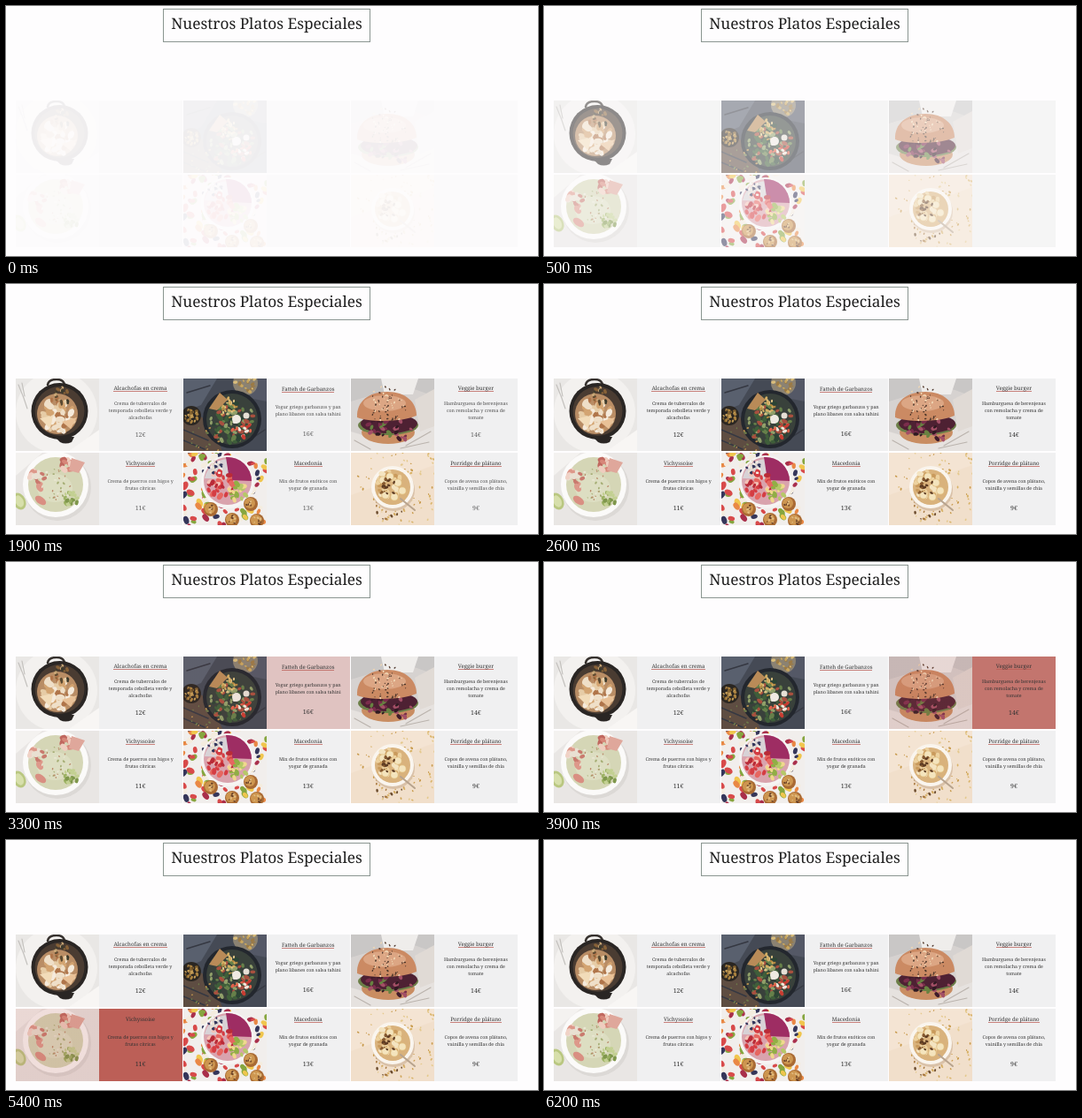
Animation of 600x283 px, one loop 6.3 s. Source, as an HTML page:

```html
<!DOCTYPE html>
<html lang="es">
<head>
<meta charset="utf-8">
<title>Nuestros Platos Especiales</title>
<style>
  html, body { margin: 0; width: 100%; height: 100%; overflow: hidden; background: #fefdfe; }
  body { font-family: "Noto Serif", serif; text-rendering: geometricPrecision; }
  #stage { position: relative; width: 600px; height: 283px; overflow: hidden; }
  h1 {
    position: absolute; left: 177px; top: 3px; width: 232px; height: 36px; margin: 0;
    border: 1px solid #8a9590; font: 400 17.25px/34px "Noto Serif", serif;
    color: #1f1f1f; text-align: center; white-space: nowrap;
  }
  .dish { position: absolute; width: 188px; height: 82px; }
  .dish > * { position: absolute; }
  .photo { left: 0; top: 0; width: 94px; height: 82px; animation: photo 6300ms infinite; }
  .panel { left: 94px; top: 0; width: 94px; height: 82px; background: #f0f0f1; animation: panel 6300ms infinite; }
  .hot {
    inset: 0; opacity: 0; animation: hot 6300ms infinite;
    background: linear-gradient(to right, rgba(187, 93, 84, .18) 50%, #bb5d54 50%);
  }
  .name, .text, .price { left: 94px; width: 93px; margin: 0; text-align: center; white-space: nowrap; color: #333; }
  .name { font-size: 6.1px; line-height: 7px; animation: name 6300ms infinite; }
  .name span { display: inline-block; height: 7px; border-bottom: 1px solid rgba(187, 93, 84, .75); }
  .text { font-size: 5.25px; line-height: 8px; animation: text 6300ms infinite; }
  .price { font-size: 7px; line-height: 8px; animation: price 6300ms infinite; }

  @keyframes photo { 0% { opacity: .07; animation-timing-function: ease-in-out } 16%, 100% { opacity: 1 } }
  @keyframes panel { 0% { opacity: .3; animation-timing-function: ease-in-out } 17%, 100% { opacity: 1 } }
  @keyframes name { 0%, 11% { opacity: 0; animation-timing-function: ease } 28%, 100% { opacity: 1 } }
  @keyframes text { 0%, 15% { opacity: 0; animation-timing-function: ease } 42%, 100% { opacity: 1 } }
  @keyframes price { 0%, 22% { opacity: 0; animation-timing-function: ease } 40%, 100% { opacity: 1 } }
  /* eases in, clears at once */
  @keyframes hot {
    0% { opacity: 0; animation-timing-function: ease }
    4.8%, 7.6% { opacity: 1; animation-timing-function: step-end }
    7.61%, 100% { opacity: 0 }
  }
</style>
</head>
<body>
<div id="stage"><h1>Nuestros Platos Especiales</h1></div>
<script>
const oval = (x, y, rx, ry, fill, turn = 0) =>
  `<ellipse cx="${x}" cy="${y}" rx="${rx}" ry="${ry}" fill="${fill}" transform="rotate(${turn} ${x} ${y})"/>`;
const disc = (x, y, r, fill) => oval(x, y, r, r, fill);
const area = (d, fill) => `<path d="${d}" fill="${fill}"/>`;
const line = (d, stroke, width) =>
  `<path d="${d}" fill="none" stroke="${stroke}" stroke-width="${width}" stroke-linecap="round"/>`;
const ground = fill => area('M0 0H94V82H0Z', fill);

function random(seed) {
  return () => (seed = (seed * 16807) % 2147483647) / 2147483647;
}

// Ovals strewn over a disc
function strew(seed, count, x, y, spread, size, colours) {
  const rnd = random(seed * 7919);
  let out = '';
  for (let i = 0; i < count; i++) {
    const a = rnd() * Math.PI * 2, d = Math.sqrt(rnd()) * spread, s = size * (.6 + rnd() * .7);
    out += oval((x + d * Math.cos(a)).toFixed(1), (y + d * Math.sin(a)).toFixed(1),
      s.toFixed(1), (s * .65).toFixed(1), colours[i % colours.length], Math.round(rnd() * 180));
  }
  return out;
}

const photos = [
  // artichokes in a black pot
  ground('#e9e7e5') + disc(46, 38, 46, '#f3f1ef') + area('M60 82L94 58V82Z', '#f8f6f4') +
  line('M3 7L9 22L13 34M7 5L10 20', '#c3c0bd', 1.2) +
  line('M36 7Q37 1 46 1Q54 1 55 7', '#36312e', 2.5) +
  area('M44 66H66L63 72Q56 75 50 72Z', '#2a2624') +
  disc(49.5, 37, 32, '#2a2624') + disc(49.5, 37, 28, '#4a3c32') + disc(47, 40, 23, '#b98d65') +
  strew(4, 52, 47, 41, 20, 4.6, ['#efdfc8', '#d3a471', '#f5eadb', '#b0754a', '#e6cca6']) +
  strew(9, 16, 54, 20, 10, 2.2, ['#5b4a32', '#876238', '#3c3a2c', '#c9a777']) +
  area('M27 45L42 42L39 57Z', '#f2dcb9') + area('M52 49L69 44L62 57Z', '#e9c197'),

  // chickpea bowl on a dark table
  ground('#454a55') + area('M0 30L30 50L44 82H0Z', '#5e4d42') + area('M0 0H38L20 30L0 38Z', '#59606e') +
  area('M62 0H94V26L74 22Z', '#545866') + line('M0 58L28 70M0 70L24 80M4 16L30 8M74 70L92 58', '#353842', 1.5) +
  disc(70, 5, 14, '#8b8272') + strew(3, 24, 70, 4, 12, 2.2, ['#c9a75f', '#d9bd7b', '#9b7a45']) +
  disc(9, 42, 11, '#2a2622') + strew(5, 26, 9, 42, 8, 2, ['#a9813f', '#c29b56', '#80602f']) +
  disc(55, 46, 33, '#23272e') + disc(55, 46, 29, '#39413b') +
  strew(8, 76, 55, 48, 25, 3.2, ['#3f5e3a', '#66804a', '#2c4434', '#90a06a', '#a8503f']) +
  strew(12, 28, 51, 33, 12, 2.2, ['#d2ad62', '#b5893f', '#e0c586']) +
  area('M29 34L41 16L50 24L38 36Z', '#b98b58') +
  strew(15, 16, 66, 57, 11, 2.8, ['#c93d32', '#e0624b', '#efe9dc']) +
  disc(60, 46, 5, '#efeae2') + disc(71, 42, 3.5, '#e6dfd5') +
  strew(6, 18, 24, 72, 18, 1.5, ['#b98f4e', '#6f7b4a']),

  // burger on paper
  ground('#d6d2d0') + area('M0 0H94V20L60 8L0 26Z', '#c9c7c6') + area('M34 0H76L70 18H38Z', '#efedeb') +
  area('M0 60L40 72L94 44V82H0Z', '#e6e2df') + area('M72 24L94 12V54L78 60Z', '#e0dad5') +
  line('M62 76L90 60M56 79L88 72M4 70L22 80', '#bbb4ae', 1.2) +
  oval(42, 61, 30, 13, '#c98d62') + oval(42, 53, 34, 11, '#6c7f48') +
  oval(43, 51, 32, 11, '#4e2133') +
  strew(7, 44, 44, 52, 26, 3, ['#7b2d4c', '#3f1b2a', '#a34f66', '#688241', '#2f1a22']) +
  area('M7 44C6 26 20 15 41 15S74 27 74 42C60 49 22 50 7 44Z', '#cb8a63') +
  oval(38, 28, 24, 9, '#dca684') +
  strew(11, 70, 41, 30, 22, 1.1, ['#f0d7b5', '#4b352a', '#5a4032']),

  // cold soup
  ground('#e9e6e4') + area('M0 0H30L0 26Z', '#f4f2f0') + oval(4, 55, 7, 10, '#b9c780', -25) +
  oval(4, 55, 4.5, 7, '#d7dfab', -25) + disc(47, 39, 38, '#dcd9d6') + disc(45, 36, 37, '#fbfaf9') +
  disc(45, 36, 31, '#d5d6b6') + oval(44, 40, 20, 16, '#dddec2') +
  strew(2, 14, 23, 31, 10, 4.6, ['#dd988a', '#c97a6e', '#f0d2c6', '#e9e0d2']) +
  strew(10, 10, 57, 13, 8, 4.4, ['#d78779', '#efcdbf', '#c0685f']) +
  area('M63 6L78 11L71 23L60 20Z', '#dfa79b') + oval(28, 54, 7, 4, '#d98f82', 35) +
  strew(6, 20, 62, 52, 8, 2.8, ['#9ab061', '#c3d092', '#7f974c']) +
  strew(14, 34, 44, 38, 20, 1.3, ['#a5ad74', '#e9e6d4', '#b98a6a']),

  // fruit bowl
  ground('#f1eeec') +
  strew(17, 170, 47, 41, 60, 4, ['#d84a4a', '#f0c64e', '#35365a', '#e98845', '#86a63f', '#a92f4b', '#f4ecdf']) +
  disc(50, 33, 30, '#f6f4f3') + disc(50, 32, 27, '#d9a3ad') +
  area('M24 29A27 27 0 0 1 74 21L51 30Z', '#d8d2d6') + area('M48 5A27 27 0 0 1 77 32L52 31Z', '#9e2d63') +
  strew(5, 30, 41, 36, 15, 3.8, ['#d53d43', '#e66660', '#f3c2b6', '#b92b38']) +
  strew(13, 22, 61, 44, 10, 3.4, ['#91ae45', '#b6c869', '#f0d88d']) +
  strew(16, 24, 36, 17, 8, 1.7, ['#e9dfcf', '#33365b', '#f6f0e7']) +
  [[31, 64], [76, 58], [55, 76], [83, 77]].map(([x, y]) =>
    disc(x, y, 8, '#a96a33') + disc(x - 1, y - 1, 6, '#cd9650') +
    strew(x, 8, x, y, 5, 1.4, ['#6b4228', '#e2bd81'])).join(''),

  // porridge
  ground('#f1dfcb') + area('M0 0H94V14L0 48Z', '#f4e4d3') +
  strew(19, 80, 58, 38, 52, 1.3, ['#d8b267', '#c89a4c', '#e4c98e']) +
  strew(22, 22, 42, 68, 18, 1.6, ['#6b4b2d', '#a8783f', '#cfa65b']) +
  disc(48, 42, 24, '#d9c1a8') + disc(47, 39, 24, '#faf5ee') + disc(47, 39, 20, '#d9b27c') +
  strew(9, 26, 45, 36, 15, 3.6, ['#edd2a0', '#c99a5c', '#f4e4c1']) +
  [[36, 31], [44, 27], [53, 34], [39, 48], [49, 50], [58, 43]].map(([x, y]) =>
    disc(x, y, 4.6, '#e0bf80') + disc(x, y, 3.8, '#f4e4bd')).join('') +
  strew(25, 18, 42, 39, 10, 1.7, ['#5c3a22', '#86592f']) +
  line('M56 52L72 65', '#b7a38e', 2)
];

// name, its height, lines, their height, price, its height, start of highlight
const dishes = [
  ['Alcachofas en crema', 117, ['Crema de tuberculos de', 'temporada cebolleta verde y', 'alcachofas'], 135, '12€', 172, 2600],
  ['Fatteh de Garbanzos', 118, ['Yogur griego garbanzos y pan', 'plano libanes con salsa tahini'], 139, '16€', 171, 3240],
  ['Veggie burger', 117, ['Hamburguesa de berenjenas', 'con remolacha y crema de', 'tomate'], 135, '14€', 172, 3740],
  ['Vichyssoise', 202, ['Crema de puerros con higos y', 'frutas cítricas'], 223, '11€', 255, 5150],
  ['Macedonia', 202, ['Mix de frutos exóticos con', 'yogur de granada'], 223, '13€', 255, 4680],
  ['Porridge de plátano', 202, ['Copos de avena con plátano,', 'vainilla y semillas de chía'], 223, '9€', 255, 4200]
];

const stage = document.getElementById('stage');
dishes.forEach(([name, nameY, lines, textY, price, priceY, start], i) => {
  const left = 11 + (i % 3) * 189.2, top = i < 3 ? 107 : 191;
  stage.insertAdjacentHTML('beforeend', `
    <div class="dish" style="left:${left}px;top:${top}px">
      <div class="panel"></div>
      <svg class="photo" viewBox="0 0 94 82">${photos[i]}</svg>
      <div class="hot" style="animation-delay:${start}ms"></div>
      <p class="name" style="top:${nameY - top - 3}px"><span>${name}</span></p>
      <p class="text" style="top:${textY - top - 4}px">${lines.join('<br>')}</p>
      <p class="price" style="top:${priceY - top - 4}px">${price}</p>
    </div>`);
});
</script>
</body>
</html>
```
